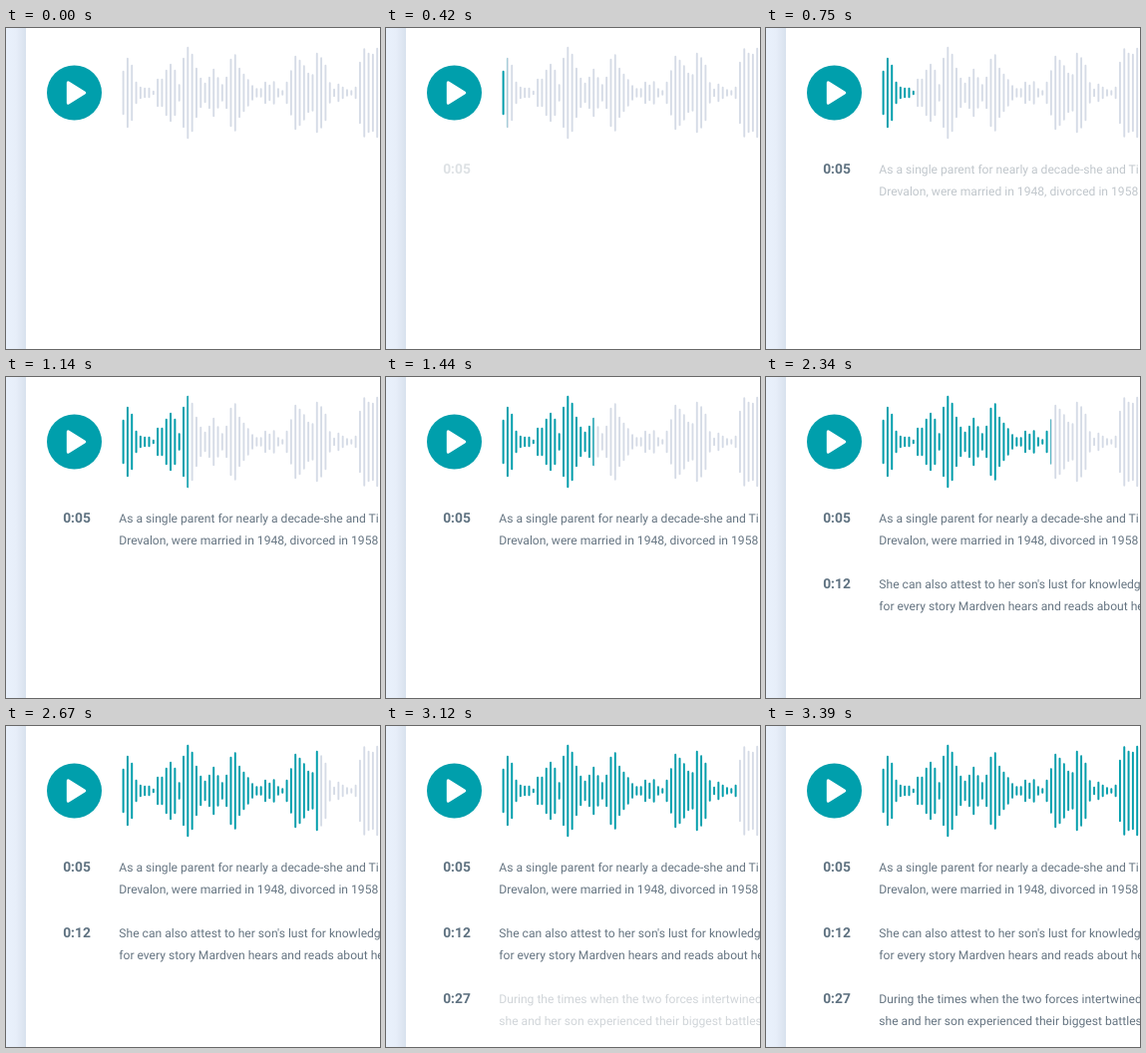
An HTML page for the animation above (4630 ms loop, 375 px wide and 322 px high).

```html
<!DOCTYPE html>
<html lang="en">
<head>
<meta charset="utf-8">
<title>Audio transcript</title>
<style>
  html, body { margin: 0; width: 100%; height: 100%; overflow: hidden; background: #fff; }
  svg { display: block; width: 375px; height: 322px; }
  text { font-family: Roboto, sans-serif; text-rendering: geometricPrecision; }
  .time { font-size: 13.8px; font-weight: 700; fill: #5f7281; }
  .line { font-size: 12.1px; fill: #667582; }
</style>
</head>
<body>
<svg viewBox="0 0 375 322">
  <defs>
    <linearGradient id="shade">
      <stop offset="0" stop-color="#e9f1fc"/>
      <stop offset=".5" stop-color="#e7eef9"/>
      <stop offset="1" stop-color="#d8e1ed"/>
    </linearGradient>
    <clipPath id="played"><rect id="head" x="110" y="0" width="0" height="130"/></clipPath>
  </defs>
  <rect width="375" height="322" fill="#fff"/>
  <rect width="20" height="322" fill="url(#shade)"/>
  <circle cx="68.5" cy="65" r="27.5" fill="#009fac"/>
  <path d="M62.3 54.8V75.2L78.7 65Z" fill="#fff" stroke="#fff" stroke-width="3" stroke-linejoin="round"/>
  <g fill="none" stroke-width="1.9" stroke-linecap="round">
    <path class="wave" stroke="#d5dbe6"/>
    <path class="wave" stroke="#009fac" clip-path="url(#played)"/>
  </g>
  <g id="rows"></g>
</svg>
<script>
const LOOP = 4630, START = 360, END = 3390, FADE = 300;
const WAVE_X = 116, SPEED = 0.0856, MID = 65;
const BAR_X = 117.6, BAR_STEP = 4.315, CAP = 0.7;

const halfHeights = [
  22, 35, 28, 11, 6, 5, 5, 2, 14, 14, 23, 29, 23, 8.5, 35, 46, 39, 25, 15, 10,
  16, 24, 15.5, 8.5, 16, 34, 38.5, 25, 19, 13.5, 7.5, 4.5, 4.5, 11, 8, 11.5, 4.5, 2.5, 11, 22.5,
  37, 33, 27.5, 20, 18.5, 40, 35.5, 28, 10.5, 4, 9, 6, 3.5, 2.5, 6, 31, 44.5, 40, 39, 45
];

const transcript = [
  ['0:05', 'As a single parent for nearly a decade-she and Ti', 'Drevalon, were married in 1948, divorced in 1958'],
  ['0:12', 'She can also attest to her son\'s lust for knowledge', 'for every story Mardven hears and reads about her'],
  ['0:27', 'During the times when the two forces intertwined', 'she and her son experienced their biggest battles']
];

const wave = halfHeights
  .map((h, i) => `M${(BAR_X + i * BAR_STEP).toFixed(2)} ${MID - h + CAP}V${MID + h - CAP}`)
  .join('');
document.querySelectorAll('.wave').forEach(p => p.setAttribute('d', wave));

const rowsEl = document.getElementById('rows');
const head = document.getElementById('head');

function addText(cls, x, y, str) {
  const el = document.createElementNS('http://www.w3.org/2000/svg', 'text');
  el.setAttribute('class', cls);
  el.setAttribute('x', x);
  el.setAttribute('y', y);
  el.textContent = str;
  rowsEl.append(el);
  return el;
}

const rows = transcript.map(([time, first, second], i) => {
  const y = 146.3 + i * 66;
  return {
    start: START + i * 1200,
    time: addText('time', 57.2, y - 0.3, time),
    lines: [addText('line', 113.3, y, first), addText('line', 113.3, y + 22, second)]
  };
});

const fade = (t, from) => Math.min(1, Math.max(0, (t - from) / FADE));

function render(t) {
  const played = Math.min(Math.max(t, START), END) - START;
  head.setAttribute('width', WAVE_X + played * SPEED - 110);
  for (const { start, time, lines } of rows) {
    time.setAttribute('opacity', fade(t, start));
    lines.forEach(el => el.setAttribute('opacity', fade(t, start + 270)));
  }
}

const origin = performance.now();
function tick() {
  render((performance.now() - origin) % LOOP);
  requestAnimationFrame(tick);
}
tick();
</script>
</body>
</html>
```
